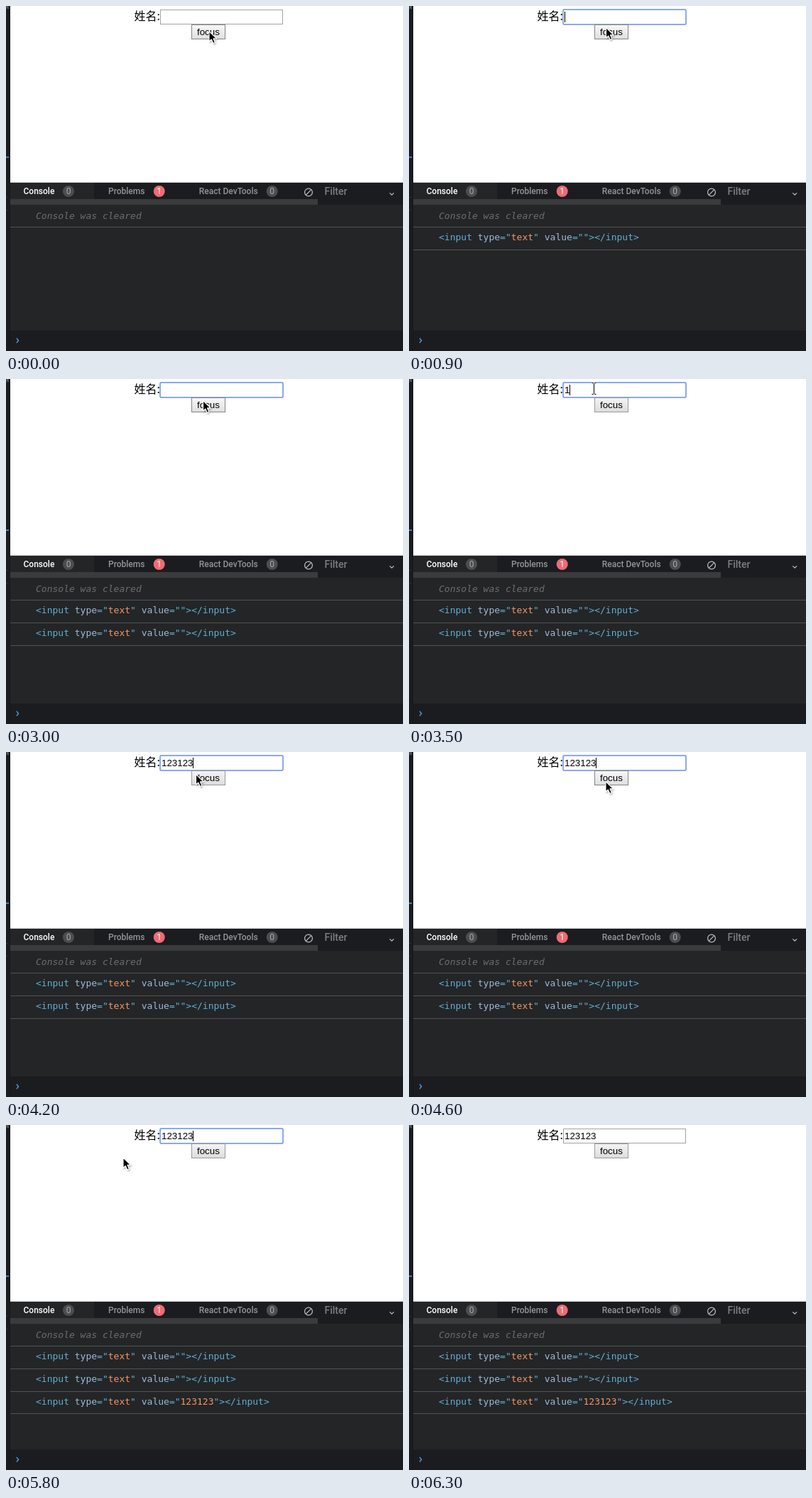
Write an HTML page that moves like this. It is 559 by 486 pixels and loops after 6.5 s.

```html
<!DOCTYPE html>
<html lang="zh">
<head>
<meta charset="utf-8">
<title>Focus demo</title>
<style>
  html, body { margin: 0; width: 100%; height: 100%; overflow: hidden; background: #242526; }
  svg { display: block; width: 559px; height: 486px; }
  text { white-space: pre; }
  rect { shape-rendering: crispEdges; }
  .label { font: 16px "Noto Sans CJK SC", "Noto Sans CJK", sans-serif; }
  .ui { font: 13.333px "Liberation Sans", Arial, sans-serif; }
  .tab { font: 500 12px Roboto, sans-serif; fill: #949596; }
  .badge { font: 12px Roboto, sans-serif; fill: #a9aaab; text-anchor: middle; }
  .filter { font: 500 14px Roboto, sans-serif; fill: #7d7e80; }
  .mono { font: 13px "DejaVu Sans Mono", monospace; fill: #5db0d7; }
  .note { font-style: italic; fill: #6d6e6f; }
  .attr { fill: #9bbbdc; }
  .value { fill: #f29766; }
</style>
</head>
<body>
<svg viewBox="0 0 559 486" xmlns="http://www.w3.org/2000/svg">
  <defs>
    <linearGradient id="normal" x2="0" y2="1"><stop stop-color="#f4f4f4"/><stop offset="1" stop-color="#dcdcdc"/></linearGradient>
    <linearGradient id="hover" x2="0" y2="1"><stop stop-color="#f8f8f8"/><stop offset="1" stop-color="#dedede"/></linearGradient>
    <linearGradient id="pressed" x2="0" y2="1"><stop stop-color="#d2d2d2"/><stop offset="1" stop-color="#e2e2e2"/></linearGradient>
    <filter id="shadow" x="-30%" y="-30%" width="180%" height="180%">
      <feDropShadow dx="1" dy="1.5" stdDeviation="1" flood-color="#000" flood-opacity=".35"/>
    </filter>
  </defs>

  <!-- page -->
  <rect width="559" height="486" fill="#242526"/>
  <rect x="6" width="553" height="249" fill="#fff"/>
  <rect y="0" width="5" height="486" fill="#1b1c20"/>
  <rect x="5" width="1" height="486" fill="#17181b"/>
  <path d="M0 5V1M1 0L3 4V0" fill="none" stroke="#77797c"/>
  <rect y="212" width="4" height="2" fill="#4280b8"/>
  <rect y="269" width="3" height="1" fill="#303135"/>
  <rect y="287" width="3" height="1" fill="#303135"/>

  <text class="label" x="180.6" y="20">姓名:</text>
  <rect id="border" x="217.5" y="5.5" width="172" height="20" fill="#fff" stroke="#a3a3a3"/>
  <rect id="ring" x="217" y="5" width="173" height="21" rx="1.5" fill="#fff" stroke="#648fec" stroke-width="1.5" style="shape-rendering:auto"/>
  <text id="typed" class="ui" x="219" y="20"></text>
  <rect id="caret" y="8" width="1" height="15" fill="#000"/>
  <rect id="button" x="261.5" y="26.5" width="47" height="20" rx="1"/>
  <text class="ui" x="269" y="41">focus</text>

  <!-- console header -->
  <rect x="6" y="248" width="553" height="1" fill="#c9c9ca"/>
  <rect x="6" y="249" width="553" height="31" fill="#1b1c20"/>
  <rect x="6" y="249" width="118" height="23" fill="#242526"/>
  <rect x="6" y="272" width="433" height="8" fill="#3a3b3d"/>
  <text class="tab" x="24.5" y="265" style="fill:#fff">Console</text>
  <text class="tab" x="144" y="265">Problems</text>
  <text class="tab" x="271.8" y="265">React DevTools</text>
  <g id="badges"></g>
  <g fill="none" stroke="#c2c3c4" stroke-width="1.2">
    <circle cx="426" cy="262.5" r="5.4"/>
    <path d="M422.2 266.3L429.8 258.7"/>
    <path d="M540.3 263.3L543.2 266.2L546.1 263.3"/>
  </g>
  <text class="filter" x="448.5" y="266">Filter</text>

  <!-- console body -->
  <text class="mono note" x="42" y="300">Console was cleared</text>
  <rect x="6" y="311" width="553" height="1" fill="#515253"/>
  <g id="rows"></g>
  <rect x="6" y="457" width="553" height="29" fill="#1b1c20"/>
  <path d="M14.8 468L17.6 471.2L14.8 474.5" fill="none" stroke="#4797dc" stroke-width="1.4"/>

  <g id="arrow" filter="url(#shadow)">
    <path d="M0 0V14.5L3.3 11.5L5.8 17L8.3 15.9L5.9 10.4H10.6Z" fill="#000" stroke="#fff" stroke-width="1.1" stroke-linejoin="round"/>
  </g>
  <g id="beam" fill="none">
    <path id="stem" d="M-3 -8H-1L0 -7L1 -8H3M0 -7V7M-3 8H-1L0 7L1 8H3" stroke="#fff" stroke-width="2.4"/>
    <path d="M-3 -8H-1L0 -7L1 -8H3M0 -7V7M-3 8H-1L0 7L1 8H3" stroke="#000"/>
  </g>
</svg>
<script>
const LOOP = 6500;
const DIGIT = 7.415;
const $ = id => document.getElementById(id);

// Each track is a list of [start time, value]; values hold until the next one.
const tracks = {
  button: [[0, "hover"], [300, "pressed"], [400, "hover"], [2100, "pressed"], [2200, "hover"],
    [3500, "normal"], [4500, "pressed"], [4600, "hover"], [5600, "normal"]],
  focus: [[0, false], [400, true], [2100, false], [2200, true], [4500, false], [4600, true], [6300, false]],
  caret: [[0, true], [1400, false], [1900, true], [3000, false], [3500, true], [5300, false], [5800, true]],
  typed: [[0, ""], [3500, "1"], [3700, "123"], [4000, "1231"], [4100, "123123"]],
  rows: [[0, 0], [500, 1], [2400, 2], [4700, 3]],
  pointer: [[0, ["arrow", 286, 35.5]], [900, ["arrow", 277.5, 30.5]], [3200, ["arrow", 268, 25]],
    [3300, ["beam", 260.5, 13.5]], [4200, ["arrow", 267.5, 31.5]], [4300, ["arrow", 277, 41.5]],
    [5600, ["arrow", 262, 48]], [5700, ["arrow", 222, 52]], [5800, ["arrow", 165, 46]],
    [5900, ["arrow", 122, 28]], [6000, ["arrow", 104, 8]], [6100, ["none", 0, 0]]]
};

const borders = { normal: "#9a9a9a", hover: "#858585", pressed: "#858585" };

function valueAt(track, t) {
  let value;
  for (const [start, v] of track) if (start <= t) value = v;
  return value;
}

function show(id, visible) {
  $(id).setAttribute("display", visible ? "inline" : "none");
}

function badge(x, digit, fill, color) {
  return `<circle cx="${x}" cy="261" r="8" fill="${fill}"/>` +
    `<text class="badge" x="${x}" y="265.3" style="fill:${color}">${digit}</text>`;
}

function row(value, i) {
  const attr = (name, v) => ` <tspan class="attr">${name}</tspan>="<tspan class="value">${v}</tspan>"`;
  const line = [343, 375, 406][i];
  return `<g id="row${i}"><text class="mono" x="42" y="${330 + i * 32}">&lt;input` +
    attr("type", "text") + attr("value", value) + `&gt;&lt;/input&gt;</text>` +
    `<rect x="6" y="${line}" width="553" height="1" fill="#515253"/></g>`;
}

$("badges").innerHTML = badge(88, 0, "#4c4d4f", "#a9aaab") +
  badge(215.7, 1, "#ef6b73", "#fff") + badge(374.7, 0, "#4c4d4f", "#a9aaab");
$("rows").innerHTML = ["", "", "123123"].map(row).join("");

function draw(t) {
  const now = {};
  for (const name in tracks) now[name] = valueAt(tracks[name], t);

  show("ring", now.focus);
  show("caret", now.focus && now.caret);
  $("caret").setAttribute("x", 219 + Math.floor(now.typed.length * DIGIT));
  $("typed").textContent = now.typed;
  $("button").setAttribute("fill", `url(#${now.button})`);
  $("button").setAttribute("stroke", borders[now.button]);
  for (let i = 0; i < 3; i++) show("row" + i, i < now.rows);

  const [kind, x, y] = now.pointer;
  for (const id of ["arrow", "beam"]) {
    show(id, id === kind);
    $(id).setAttribute("transform", `translate(${x} ${y})`);
  }
}

const begin = performance.now();
function tick() {
  draw((performance.now() - begin) % LOOP);
  requestAnimationFrame(tick);
}
tick();
</script>
</body>
</html>
```
